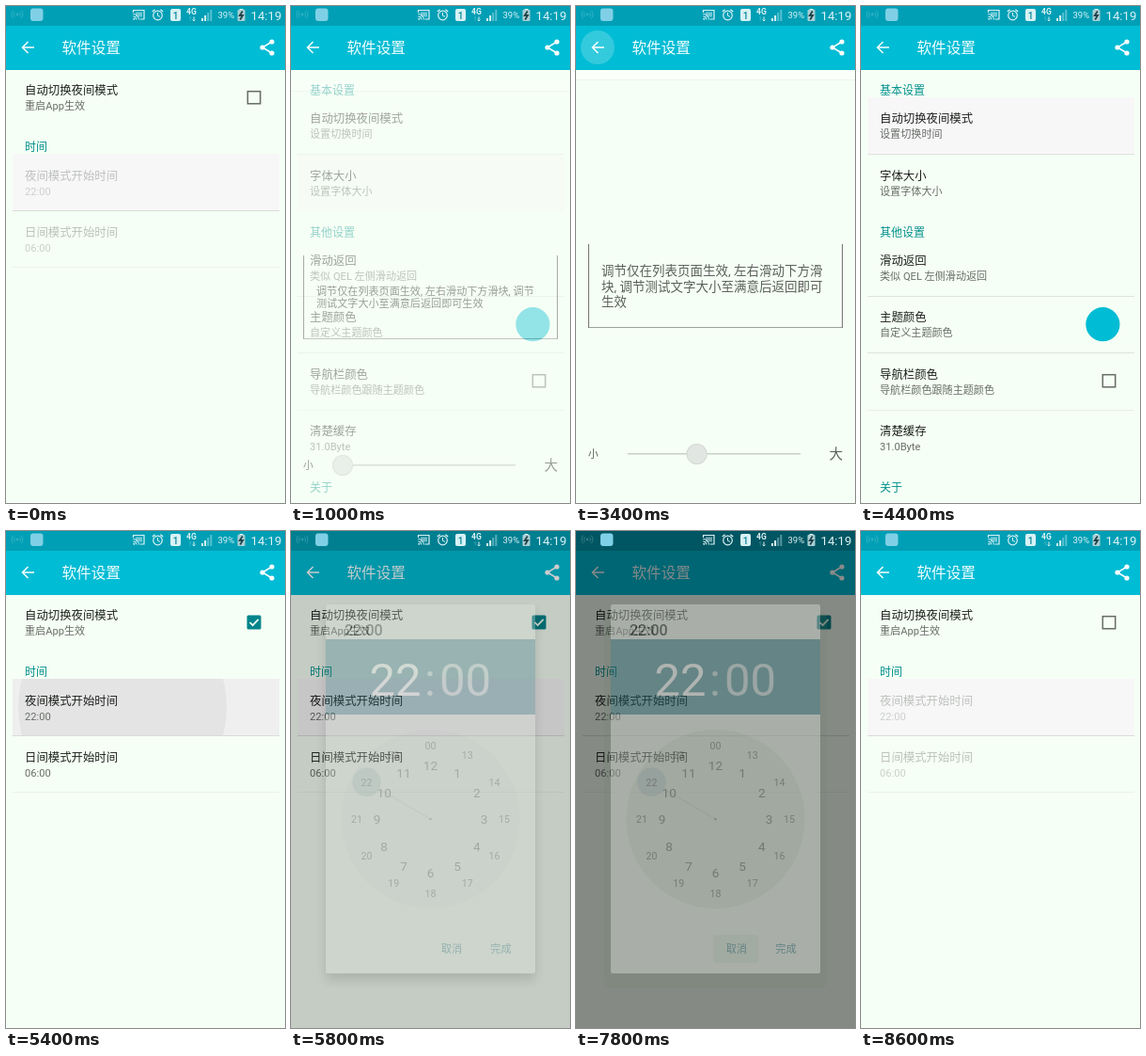
Recreate the animation shown at these times as an HTML page with a canvas. Size 297 by 528 pixels, loop 8.8 s.

```html
<!DOCTYPE html>
<html lang="zh-CN">
<head>
<meta charset="utf-8">
<title>软件设置</title>
<style>
html, body { margin: 0; width: 100%; height: 100%; overflow: hidden; background: #f5fff5; }
canvas { display: block; width: 297px; height: 528px; }
</style>
</head>
<body>
<canvas id="stage"></canvas>
<script>
const W = 297, H = 528, LOOP = 8800, STEP = 200, TOP = 68;
const FONT = 'Roboto, "Noto Sans CJK SC", "Noto Sans CJK", sans-serif';
const CYAN = '#00bcd4', PAGE = '#f5fff5', TEAL = '#008f8c', FOCUS = '#f8f7f8';
const dpr = window.devicePixelRatio || 1;

function context(canvas) {
  canvas.width = W * dpr;
  canvas.height = H * dpr;
  const ctx = canvas.getContext('2d');
  ctx.scale(dpr, dpr);
  return ctx;
}
const stage = context(document.getElementById('stage'));
const buffer = context(document.createElement('canvas'));
let c = stage;

function text(s, x, y, size, color, align = 'left', weight = 400) {
  c.font = `${weight} ${size}px ${FONT}`;
  c.textAlign = align;
  c.fillStyle = color;
  c.fillText(s, x, y + size * 0.38);
}
function rect(x, y, w, h, color) {
  c.fillStyle = color;
  c.fillRect(x, y, w, h);
}
function round(x, y, w, h, r, color) {
  c.beginPath();
  c.roundRect(x, y, w, h, r);
  c.fillStyle = color;
  c.fill();
}
function disc(x, y, r, color) {
  c.beginPath();
  c.arc(x, y, r, 0, Math.PI * 2);
  c.fillStyle = color;
  c.fill();
}
function line(points, color, width = 1) {
  c.beginPath();
  points.forEach(([x, y]) => c.lineTo(x, y));
  c.strokeStyle = color;
  c.lineWidth = width;
  c.stroke();
}
function arc(x, y, r, from, to, color, width = 1) {
  c.beginPath();
  c.arc(x, y, r, from, to);
  c.strokeStyle = color;
  c.lineWidth = width;
  c.stroke();
}
// Draws a whole group as one translucent layer.
function faded(alpha, draw, dy = 0) {
  buffer.clearRect(0, 0, W, H);
  c = buffer;
  draw();
  c = stage;
  c.save();
  c.globalAlpha = alpha;
  c.drawImage(buffer.canvas, 0, dy, W, H);
  c.restore();
}

// Bars
function statusIcons() {
  const ink = '#dcf2f5', pale = 'rgba(190,235,242,.25)';
  disc(12, 9, 1.4, pale);
  for (const r of [3.5, 6]) {
    arc(12, 9, r, -0.8, 0.8, pale);
    arc(12, 9, r, Math.PI - 0.8, Math.PI + 0.8, pale);
  }
  round(26, 2.5, 13.5, 13.5, 3, '#7fd0e6');

  line([[135.5, 7], [135.5, 4.5], [147, 4.5], [147, 14], [142.5, 14]], ink, 1.2);
  rect(138, 6.5, 7, 5, 'rgba(220,242,245,.5)');
  disc(136.3, 13.8, 1, ink);
  arc(135.3, 14.5, 3.6, -Math.PI / 2, 0, ink);
  arc(135.3, 14.5, 6, -Math.PI / 2, 0, ink);

  arc(161.5, 10, 4.8, 0, Math.PI * 2, ink, 1.2);
  line([[161.5, 7], [161.5, 10.3], [164, 11.3]], ink);
  line([[155.8, 6], [158.6, 3.7]], ink, 1.4);
  line([[164.4, 3.7], [167.2, 6]], ink, 1.4);

  round(175, 3, 11, 13, 2, '#d8f2f5');
  text('1', 180.5, 9.7, 10, '#078497', 'center', 500);
  text('4G', 192, 5.8, 8.5, ink, 'left', 700);
  line([[196.2, 16], [196.2, 11.5]], pale);
  line([[194.8, 13], [196.2, 11.5], [197.6, 13]], pale, 0.8);
  line([[200, 11.5], [200, 16]], ink);
  line([[198.6, 14.5], [200, 16], [201.4, 14.5]], ink, 0.8);
  for (let i = 0; i < 4; i++) {
    rect(208 + i * 3.1, 13 - i * 3, 2, 3 + i * 3, i < 2 ? ink : 'rgba(220,245,250,.4)');
  }
  text('39%', 225.5, 9.7, 9.5, ink);
  rect(248.5, 3, 4, 1.5, ink);
  round(246.5, 4, 8, 12, 1, '#a9cfd4');
  line([[251.8, 5.5], [248.8, 10], [252, 10], [249.2, 14.5]], '#23434b', 1.8);
  text('14:19', 260.5, 9.6, 13.2, ink);
}
function bars() {
  rect(0, 0, W, 21, '#009fb5');
  rect(0, 21, W, TOP - 21, CYAN);
  line([[30, 44], [18, 44]], '#fff', 1.5);
  line([[23.5, 38], [17.5, 44], [23.5, 50]], '#fff', 1.5);
  text('软件设置', 59.5, 44, 15.6, '#f4feff');
  const dots = [[283, 38], [273, 44], [283, 50]];
  line(dots, '#fff', 1.5);
  dots.forEach(([x, y]) => disc(x, y, 2.6, '#fff'));
}

// Settings rows
const section = (s, y) => text(s, 20, y, 12, TEAL);
const divider = (y, color = '#dde4dd') => rect(7, y, 284, 1, color);
const band = (y, color = FOCUS) => rect(7, y, 284, 60, color);
const page = () => rect(0, TOP, W, H - TOP, PAGE);

function row(y, title, sub, on = true) {
  text(title, 20, y, 12.4, on ? '#1d201d' : '#bcc1bc');
  text(sub, 20, y + 17, 11.1, on ? '#686d68' : '#cbd0cb');
}
function checkbox(y, on) {
  if (on) {
    round(256.5, y - 7.5, 15, 15, 1.5, '#00848c');
    line([[259.5, y], [262.6, y + 3.2], [268.7, y - 3.2]], '#f5fff5', 1.7);
  } else {
    c.strokeStyle = '#666b66';
    c.lineWidth = 1.5;
    c.strokeRect(257.3, y - 6.3, 13.4, 13.1);
  }
}
function ripple(y, x, r) {
  c.save();
  c.beginPath();
  c.rect(7, y, 284, 60);
  c.clip();
  band(y, '#efefef');
  disc(x, y + 30, r, '#e4e4e4');
  c.restore();
}

// Pages
function list(under) {
  page();
  if (under) under();
  section('基本设置', 89);
  row(119, '自动切换夜间模式', '设置切换时间');
  divider(157);
  row(180, '字体大小', '设置字体大小');
  section('其他设置', 240);
  row(270, '滑动返回', '类似 QEL 左侧滑动返回');
  divider(308);
  row(330, '主题颜色', '自定义主题颜色');
  disc(257.4, 338.2, 18.1, CYAN);
  divider(368);
  row(391, '导航栏颜色', '导航栏颜色跟随主题颜色');
  checkbox(398, false);
  divider(429, '#e8efe8');
  row(451, '清楚缓存', '31.0Byte');
  section('关于', 511);
}
function night(on, under) {
  page();
  if (under) under();
  row(89, '自动切换夜间模式', '重启App生效');
  checkbox(97, on);
  section('时间', 149);
  row(180, '夜间模式开始时间', '22:00', on);
  divider(217, '#d8ddd8');
  row(240, '日间模式开始时间', '06:00', on);
  divider(277, '#ebf3eb');
}
const HINT = '调节仅在列表页面生效, 左右滑动下方滑块, 调节测试文字大小至满意后返回即可生效';

function wrap(s, size, width) {
  c.font = `400 ${size}px ${FONT}`;
  const lines = [''];
  for (const ch of s) {
    const last = lines.length - 1;
    if (c.measureText(lines[last] + ch).width > width) lines.push(ch);
    else lines[last] += ch;
  }
  return lines;
}
function fontPage(v) {
  page();
  rect(0, TOP, W, 10, '#fafffa');
  rect(0, 78, W, 1, '#edf4ed');
  line([[13, 341.5], [284, 341.5]], '#9da29d');
  line([[13.5, 253], [13.5, 342]], '#727772');
  line([[283.5, 253], [283.5, 342]], '#727772');
  const size = 11.1 + 6 * v, gap = size * 1.22;
  const lines = wrap(HINT, size, 240);
  lines.forEach((s, i) => text(s, 27, 297.5 + (i - (lines.length - 1) / 2) * gap, size, '#5b605b'));
  text('小', 13, 476, 10.8, '#5d625d');
  text('大', 269.5, 475.5, 14.6, '#5d625d');
  rect(55, 475, 184, 1.5, '#c9d0c9');
  const x = 55 + 184 * v;
  disc(x, 476, 11, '#cfd4cf');
  disc(x, 476, 10.2, '#e2e6e2');
}

// Time picker
function dialog(closing) {
  c.save();
  if (closing) {
    round(30, 85, 237, 401, 8, 'rgba(100,130,100,.4)');
  } else {
    c.shadowColor = 'rgba(0,0,0,.4)';
    c.shadowBlur = 12 * dpr;
    c.shadowOffsetY = 7 * dpr;
  }
  round(37, 78, 223, 392, 2, '#e4ebe3');
  c.restore();
  text('22:00', 57, 105, 16, '#151a18', 'left', 500);
  rect(37, 115, 223, 80, '#347c86');
  text('22', 111, 156.5, 49, '#f4faf8', 'center');
  text(':', 148, 156.5, 49, '#b4ced0', 'center');
  text('00', 185.5, 156.5, 49, '#bfd4d6', 'center');

  const cx = 148.5, cy = 306;
  disc(cx, cy, 95, closing ? '#cfdccf' : '#dcdedc');
  const at = (hour, r) => {
    const a = hour * Math.PI / 6;
    return [cx + r * Math.sin(a), cy - r * Math.cos(a)];
  };
  const pick = at(10, 78.5);
  line([[cx, cy], at(10, 63)], '#b9c8c5', 1.3);
  disc(...pick, 15.2, '#b2c4c2');
  disc(cx, cy, 1.1, '#4d6868');
  for (let h = 0; h < 12; h++) {
    text(h ? String(h + 12) : '00', ...at(h, 78.5), 10.6, '#5d625d', 'center');
    text(String(h || 12), ...at(h, 57), 13.6, '#565b56', 'center');
  }
  if (closing) round(146, 429, 48, 30, 2, '#d3e2d3');
  text('取消', 171, 444, 11.2, '#2b7780', 'center');
  text('完成', 223.5, 444, 11.2, '#2b7780', 'center');
}
function popup(scrim, alpha, closing) {
  rect(0, 0, W, H, `rgba(0,0,0,${scrim})`);
  faded(alpha, () => dialog(closing));
}

// Timeline
const backTap = () => disc(23, 44, 18, 'rgba(255,255,255,.2)');
const focusRow = () => band(157);
const sweep = t => t <= 2200
  ? 0.8 * Math.sin(Math.PI * (t - 1200) / 1000) ** 2
  : 0.4 * Math.sin(Math.PI / 2 * (t - 2200) / 800);

const scenes = [
  [0, () => night(false, focusRow)],
  [200, () => { night(false, focusRow); backTap(); }],
  [400, () => { list(); faded(0.4, () => night(false, focusRow), 12); }],
  [600, () => list(() => band(97))],
  [800, () => list(() => ripple(158, 110, 95))],
  [1000, () => { list(() => band(158)); faded(0.6, () => fontPage(0), 12); }],
  [1200, t => fontPage(sweep(Math.min(t, 3000)))],
  [3400, () => { fontPage(sweep(3000)); backTap(); }],
  [3600, () => { list(() => band(158)); faded(0.4, () => fontPage(sweep(3000)), 12); }],
  [3800, () => list(() => band(158))],
  [4000, () => list()],
  [4200, () => list(() => ripple(97, 120, 90))],
  [4400, () => list(() => band(97))],
  [4600, () => { list(() => band(97)); faded(0.6, () => night(false), 12); }],
  [4800, () => night(false)],
  [5000, () => night(false, () => ripple(68, 262, 80))],
  [5200, () => night(true, () => band(68))],
  [5400, () => night(true, () => ripple(157, 124, 111))],
  [5600, () => night(true, () => band(157, '#e8e8e8'))],
  [5800, () => { night(true, focusRow); popup(0.2, 0.3); }],
  [6000, () => { night(true); popup(0.46, 0.8); }],
  [6200, () => { night(true); popup(0.58, 1); }],
  [7800, () => { night(true); popup(0.46, 0.38, true); }],
  [8000, () => night(true, focusRow)],
  [8200, () => night(true, () => { focusRow(); ripple(68, 262, 80); })],
  [8400, () => night(false, () => { focusRow(); band(68); })],
  [8600, () => night(false, focusRow)]
];

function frame() {
  const t = Math.floor(performance.now() % LOOP / STEP) * STEP;
  c.clearRect(0, 0, W, H);
  bars();
  scenes.findLast(([start]) => start <= t)[1](t);
  statusIcons();
  requestAnimationFrame(frame);
}
frame();
</script>
</body>
</html>
```
